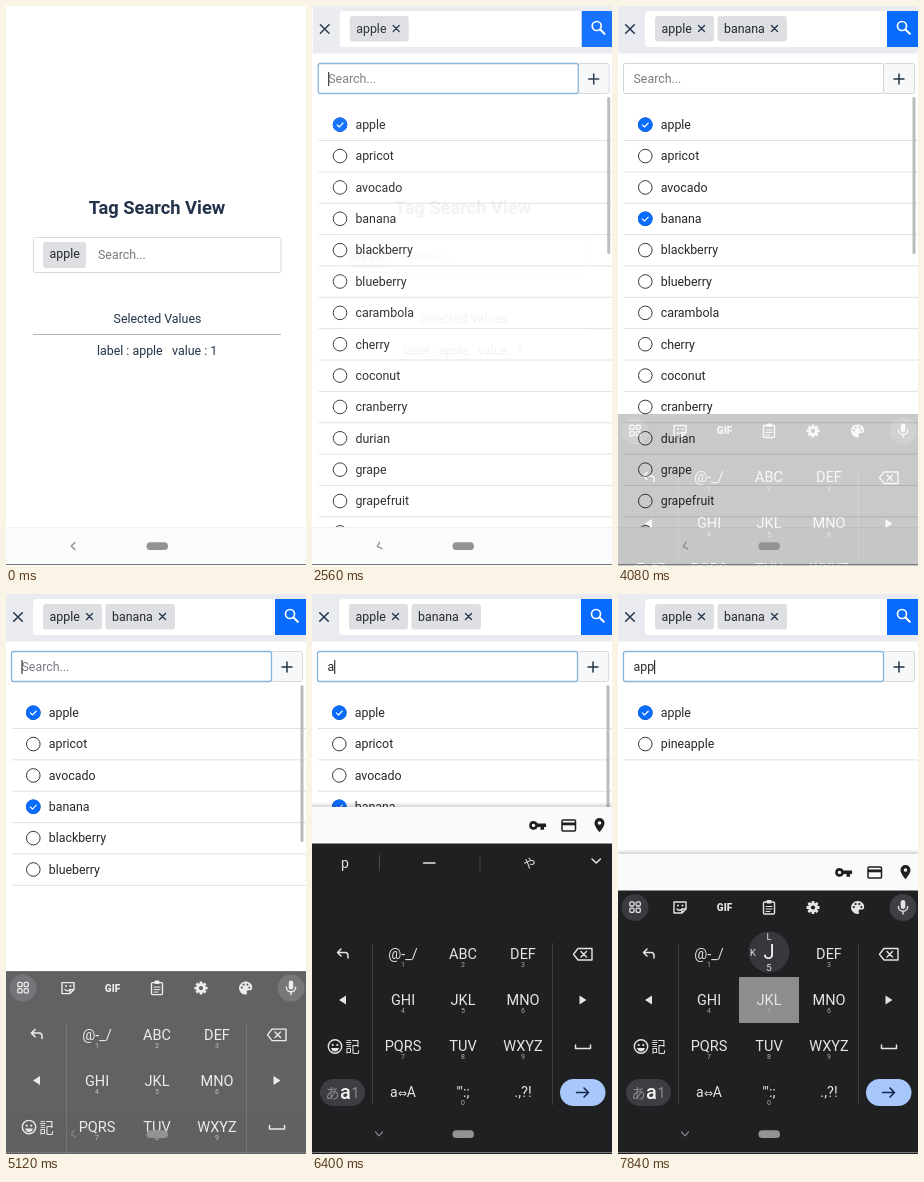
An HTML page for the animation above (8 s loop, 300 px wide and 560 px high).

```html
<!DOCTYPE html>
<html lang="en">
<head>
<meta charset="utf-8">
<title>Tag Search View</title>
<style>
  html, body { margin: 0; height: 100%; overflow: hidden; background: #fff; }
  svg { display: block; width: 100vw; height: 100vh; font: 12.4px Roboto, "Noto Sans CJK JP", "Noto Sans CJK", sans-serif; }
  .mid { text-anchor: middle; }
  .ln { fill: none; stroke-linecap: round; stroke-linejoin: round; }
</style>
</head>
<body>
<svg id="stage" viewBox="0 0 300 560" xmlns="http://www.w3.org/2000/svg"></svg>
<script>
const LOOP = 8000, ROW = 31.36, DARK = '#1f2022', KEY = '#e4e4e6', INK = '#22334a';
const FRUIT = ('apple apricot avocado banana blackberry blueberry carambola cherry coconut cranberry ' +
  'durian grape grapefruit guava lemon mango melon orange papaya peach pineapple').split(' ');
const COLS = [91, 151, 211], ROWS = [360, 406, 452, 498];
const KEYS = ['@-_/', 'ABC', 'DEF', 'GHI', 'JKL', 'MNO', 'PQRS', 'TUV', 'WXYZ', '', '\'":;', '.,?!'];
const DIGITS = '123456789 0 ';

// markup helpers
const rect = (x, y, w, h, fill, r = 0, more = '') =>
  `<rect x="${x}" y="${y}" width="${w}" height="${h}" rx="${r}" fill="${fill}" ${more}/>`;
const text = (x, y, s, fill = '#25282c', more = '') => `<text x="${x}" y="${y}" fill="${fill}" ${more}>${s}</text>`;
const mid = (x, y, s, fill, size) => text(x, y, s, fill, `class="mid" font-size="${size}"`);
const line = (d, stroke, w = 1, more = '') => `<path class="ln" d="${d}" stroke="${stroke}" stroke-width="${w}" ${more}/>`;
const shape = (d, fill) => `<path d="${d}" fill="${fill}" fill-rule="evenodd"/>`;
const disc = (x, y, r, fill, more = '') => `<circle cx="${x}" cy="${y}" r="${r}" fill="${fill}" ${more}/>`;
const cross = (x, y, r, w) => line(`M${x - r} ${y - r}l${2 * r} ${2 * r}m0 ${-2 * r}l${-2 * r} ${2 * r}`, INK, w);
const group = (id, body, more = '') => `<g id="${id}" ${more}>${body}</g>`;

const page =
  text(151, 208, 'Tag Search View', INK, 'class="mid" font-size="18.3" font-weight="700"') +
  rect(27.5, 231.5, 247.5, 35, '#fff', 2, 'stroke="#d6d8db"') +
  rect(37, 236, 43, 26, '#dddfe3', 3) + text(43.5, 252, 'apple') + text(92, 253, 'Search...', '#757a80') +
  text(151.5, 317, 'Selected Values', INK, 'class="mid"') + rect(27, 328, 248, 1, '#b4b6b8') +
  text(91, 349, 'label : apple', INK) + text(166, 349, 'value : 1', INK);

const tag = (x, w, s) => rect(x, 10, w, 25.5, '#dddfe3', 3) + text(x + 6.5, 26.5, s) + cross(x + w - 12.5, 22.5, 3, 1.3);

const row = (s, i) => group('row' + i,
  disc(27.3, 0, 6.8, '#fff', 'stroke="#33363a"') +
  group('on' + i, disc(27.3, 0, 7.3, '#0a6cff') + line('M24.3 .2l2.2 2.1l3.8 -4', '#fff', 1.1)) +
  text(42.7, 4.3, s) + rect(6, 15.3, 294, 1, '#dfe1e4'));

const picker =
  rect(-20, 0, 340, 521, '#fff') + rect(0, 0, 320, 47.5, '#e9ebf0') + cross(12, 23, 4.3, 1.5) +
  rect(27, 5, 250, 36, '#fff', 4) + rect(269, 5, 40, 36, '#0a6cff') +
  disc(284, 20, 4.5, 'none', 'stroke="#fff" stroke-width="1.7"') + line('M287.5 23.5l4.3 4.3', '#fff', 2) +
  tag(37, 59, 'apple') + group('tag2', tag(99.5, 69.5, 'banana')) +
  rect(265.5, 57.5, 31, 30, '#f7f8fa', 2, 'stroke="#d4d7db"') + line('M281 68v10m-5 -5h10', INK, 1.5) +
  rect(5.5, 57.5, 260, 30, '#fff', 2, 'id="field"') + text(15.5, 77, '', '#25282c', 'id="typed"') +
  rect(0, 66, 1, 14, '#111', 0, 'id="caret"') +
  group('list', FRUIT.map(row).join(''), 'clip-path="url(#view)"') +
  rect(294.5, 91, 3, 157, '#b9bbbd', 1.5, 'id="thumb"');

const autofill = rect(0, 0, 300, 40, '#fafafc') +
  // key, card, pin
  shape('M221.5 14a4.4 4.4 0 1 0 4.2 6h2.8v2.8h3.6V20h2V16.6h-8.4a4.4 4.4 0 0 0 -4.2 -2.6z' +
    'm0 2.7a1.7 1.7 0 1 1 0 3.4a1.7 1.7 0 1 1 0 -3.4z', '#1e1f21') +
  rect(250, 13, 13.5, 11, 'none', 1, 'stroke="#1e1f21" stroke-width="1.5"') + rect(250, 15.5, 13.5, 2.8, '#1e1f21') +
  shape('M287.5 11a5 5 0 0 1 5 5c0 3.600 -5 9.300 -5 9.300s-5 -5.700 -5 -9.300a5 5 0 0 1 5 -5zm0 3.200a1.800 1.800 0 1 0 0 3.600a1.800 1.800 0 1 0 0 -3.600z', '#1e1f21');

const dots = [0, 1, 2, 3].map(i =>
  rect(11.8 + i % 2 * 6.3, 307.8 + (i >> 1) * 6.3, 4.2, 4.2, 'none', 1.2, `stroke="${KEY}" stroke-width="1.3"`)).join('');
const cogs = [0, 45, 90, 135].map(a => rect(193.6, 307, 2.8, 13, KEY, .5, `transform="rotate(${a} 195 313.5)"`)).join('');

const tools =
  disc(17, 313.5, 13.5, '#3a3b3f') + dots +
  line('M56 308h12v7l-4 4h-8zM68 315h-4v4M59 315q2.500 2.500 5 0', KEY, 1.4) + disc(60, 311.500, 1, KEY) + disc(64.500, 311.500, 1, KEY) +
  text(106.500, 317, 'GIF', KEY, 'class="mid" font-size="10" font-weight="900"') +
  rect(145.500, 308, 11, 12, 'none', 1, `stroke="${KEY}" stroke-width="1.400"`) + rect(148.500, 306, 5, 3.500, KEY, 1) +
  line('M148 312.500h6m-6 2.500h6m-6 2.500h4', KEY, 1) +
  cogs + disc(195, 313.500, 4.800, KEY) + disc(195, 313.500, 2.100, DARK) +
  shape('M239.500 307a6.500 6.500 0 1 0 0 13c2 0 1.500 -1.800 1.200 -2.500c-.4 -1.200 .5 -1.900 1.600 -1.900h1.500q2.400 0 2.400 -2.800c0 -3.300 -3 -5.800 -6.700 -5.800z', KEY) +
  [[235.8, 313], [237.6, 310], [241.4, 310], [243.4, 313]].map(p => disc(...p, 1.1, DARK)).join('') +
  disc(285, 313.5, 13.5, '#3f4044') + rect(282.7, 306, 4.6, 9, KEY, 2.3) + line('M280.3 312.500a4.700 4.700 0 0 0 9.400 0M285 317.500v2.500', KEY, 1.4);

const words =
  rect(0, 249.5, 300, 50, DARK) + mid(33, 273.500, 'p', KEY, 14) + line('M111.500 269h11.500', KEY, 1.3) +
  mid(217.500, 273.500, 'や', KEY, 12.5) + rect(67, 261, 1, 16, '#48494c') + rect(167.500, 261, 1, 16, '#48494c') +
  line('M280 265l4.200 4l4.200 -4', KEY, 1.5);

const label = (s, i) => {
  const x = COLS[i % 3], y = ROWS[i / 3 | 0];
  return mid(x, y + 5, s, KEY, 14.5) + mid(x, y + 13.3, DIGITS[i], '#a9abae', 7);
};

const keys =
  rect(60, 349, 1, 162, '#3d3e41') + rect(240, 349, 1, 162, '#3d3e41') +
  rect(0, 0, 60, 46, '#8c8d8e', 0, 'id="hit"') + KEYS.map(label).join('') +
  text(91, 503, 'a<tspan font-size="11" font-family="DejaVu Sans, sans-serif">⇔</tspan>A', KEY, 'class="mid" font-size="14"') +
  line('M29 355l-3.500 3.500l3.500 3.500M26 358.500h7a3 3 0 0 1 3 3v2.500', KEY, 1.5) +
  shape('M34 401.500v9l-7 -4.500zM267.500 401.500v9l7 -4.500z', KEY) +
  disc(23, 452.5, 6.7, 'none', `stroke="${KEY}" stroke-width="1.4"`) + disc(20.7, 451, 1.1, KEY) + disc(25.3, 451, 1.1, KEY) +
  shape('M19 454h8q-1 3.500 -4 3.500t-4 -3.500z', KEY) + mid(40.5, 458, '記', KEY, 14.5) +
  rect(8, 485, 45, 27, '#3d3e41', 13.5) + mid(20.5, 504, 'あ', '#8b8d91', 14) +
  text(33.5, 504.5, 'a', '#f2f2f2', 'class="mid" font-size="20" font-weight="500"') + mid(43.5, 504, '1', '#8b8d91', 14) +
  line('M266 354.500h14v11.500h-14l-4.500 -5.750zM269 357.500l5.500 5.500m0 -5.500l-5.500 5.500', KEY, 1.4) +
  line('M263.500 451v3.500h15v-3.500', KEY, 1.5) +
  rect(248, 485, 45.5, 27, '#a8c7fa', 13.5) + line('M264.500 498.500h12m-4.500 -4.500l4.500 4.500l-4.500 4.500', '#14284f', 1.6) +
  group('bubble', disc(0, 0, 20.5, '#37383c') + mid(0, 7, '', '#f2f2f2', 20) + mid(0, -12, '', KEY, 9.5) +
    mid(-16, 3.5, '', KEY, 9.5) + mid(16, 3.5, '', KEY, 9.5) + mid(0, 18.5, '', KEY, 9.5));

const stage = document.getElementById('stage');
stage.innerHTML =
  `<defs><clipPath id="view"><rect id="viewBox" x="-20" y="90" width="340" height="0"/></clipPath>
  <linearGradient id="shade" x2="0" y2="1"><stop stop-color="#000" stop-opacity="0"/><stop offset="1" stop-color="#000" stop-opacity=".16"/></linearGradient></defs>` +
  rect(0, 0, 300, 560, '#fff') + page + group('picker', picker) +
  rect(0, 521, 300, 39, '#fbfbfd') + rect(0, 521, 300, 1, '#eff0f2') +
  group('bar', rect(0, -5, 300, 5, 'url(#shade)') + autofill) +
  group('board', rect(0, 296.5, 300, 420, DARK) + group('tools', tools) + group('words', words) + keys) +
  line('M2 -3.500l-3.800 3.500l3.800 3.500', '#85878a', 1.2, 'id="back"') + rect(140.500, 536.300, 21.500, 7.700, '#939393', 3.850) +
  rect(0, 558, 300, 1, '#77787a');

const el = {};
stage.querySelectorAll('[id]').forEach(n => el[n.id] = n);
const set = (id, name, v) => el[id].setAttribute(name, v);
const show = (id, on) => set(id, 'visibility', on ? 'visible' : 'hidden');
const move = (id, x, y, more = '') => set(id, 'transform', `translate(${x} ${y}) ${more}`);

const within = (t, a, b) => t >= a && t < b;
const ramp = (t, a, d) => Math.min(1, Math.max(0, (t - a) / d));
const out = p => 1 - (1 - p) ** 2;

// [from, to, key index, centre, top, left, right]
const PRESSES = [
  [6080, 6160, 1, 'A', 'C', 'B', ''],
  [6560, 6640, 6, 'P', 'R', 'Q', 'S'],
  [7040, 7200, 6, 'P', 'R', 'Q', 'S'],
  [7840, 8000, 4, 'J', 'L', 'K', '']
];

function drawKeyboard(t) {
  const opened = t < 5040 ? 2580 : 5060;
  const e = within(t, 3990, 5040) ? (1 - ramp(t, 3990, 140)) ** 2 : out(ramp(t, opened, 300));
  const lift = within(t, 6400, 7600) ? 47 : 0;
  const docked = within(t, opened + 340, 3990) || t >= opened + 340 && t > 5040;

  show('board', e > 0);
  set('board', 'opacity', Math.min(1, 1.92 * e));
  move('board', 0, 127 * (1 - e));
  show('bar', docked);
  move('bar', 0, 260 - lift);
  show('words', lift && e > 0);
  show('tools', !lift && e > 0);

  const turn = within(t, 3990, 5040) ? 1 - ramp(t, 3930, 180) : ramp(t, t < 5040 ? 2500 : 5080, 260);
  move('back', 67, 540, `rotate(${-90 * turn})`);

  const shrunk = within(t, 2620, 3990) || t >= 5060;
  set('viewBox', 'height', (docked ? 260 - lift : shrunk ? 296 : 521) - 90);

  const press = PRESSES.find(p => within(t, p[0], p[1]));
  show('hit', press);
  show('bubble', press);
  if (press) {
    const x = COLS[press[2] % 3], y = ROWS[press[2] / 3 | 0];
    move('hit', x - 30, y - 23);
    move('bubble', x, y - 48);
    const marks = [...press.slice(3), DIGITS[press[2]]];
    el.bubble.querySelectorAll('text').forEach((n, i) => n.textContent = marks[i]);
  }
}

function drawPicker(t) {
  const e = out(ramp(t, 2240, 425));
  set('picker', 'opacity', e);
  show('picker', e > 0);
  move('picker', 12 * (1 - e), 0);
  if (!e) ['tag2', 'caret', 'thumb'].forEach(id => show(id, false));

  const banana = t >= 3600;
  const focus = within(t, 2240, 3600) || t >= 5040;
  const blink = within(t, 2960, 3200) || within(t, 5520, 5840);
  const typed = 'app'.slice(0, (t >= 6160) + (t >= 6640) + (t >= 7200));

  show('tag2', banana);
  set('field', 'stroke', focus ? '#86b4dc' : '#d0d4d9');
  set('field', 'stroke-width', focus ? 1.3 : 1);
  el.typed.textContent = typed || 'Search...';
  set('typed', 'fill', typed ? '#25282c' : '#757a80');
  set('caret', 'x', 15.5 + (typed ? el.typed.getComputedTextLength() : 0));
  show('caret', e > 0 && focus && !blink);
  show('thumb', e > 0 && typed.length < 2);

  let n = 0;
  FRUIT.forEach((name, i) => {
    const hit = name.includes(typed);
    set('row' + i, 'display', hit ? 'inline' : 'none');
    set('on' + i, 'display', name === 'apple' || banana && name === 'banana' ? 'inline' : 'none');
    if (hit) move('row' + i, 0, 118.7 + ROW * n++);
  });
}

function draw(t) {
  drawPicker(t);
  drawKeyboard(t);
}

const start = performance.now();
function tick() {
  draw((performance.now() - start) % LOOP);
  requestAnimationFrame(tick);
}
draw(0);
requestAnimationFrame(tick);
</script>
</body>
</html>
```
